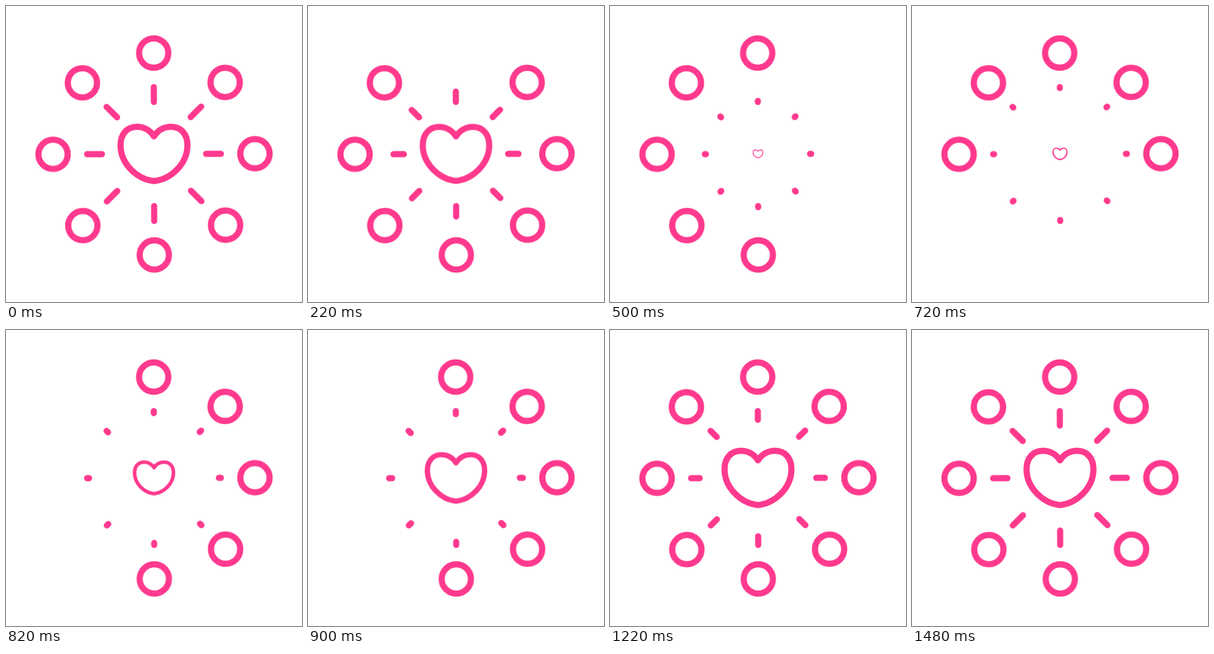
Recreate the animation shown at these times as an HTML page. Size 500 by 500 pixels, loop 1.5 s.

```html
<!DOCTYPE html>
<html lang="en">
<head>
<meta charset="utf-8">
<title>Heart with rays</title>
<style>
  html, body { margin: 0; width: 100%; height: 100%; overflow: hidden; background: #fff; }
  svg { display: block; width: 100vw; height: 100vh; }
  .art { fill: none; stroke: #ff3a8e; stroke-width: 10.4; stroke-linecap: round; stroke-linejoin: round; }

  .heart { transform-origin: 250px 249.7px; animation: beat 1.5s infinite; }
  .ray { stroke-dasharray: 25 60; animation: sweep 1.5s infinite; }
  .dot { animation: 1.5s step-end infinite; }
  .n { animation-name: hide-n; }
  .ne, .e { animation-name: hide-e; }
  .se { animation-name: hide-se; }
  .s { animation-name: hide-s; }
  .sw { animation-name: hide-sw; }
  .w, .nw { animation-name: hide-w; }

  @keyframes beat {
    0%, 13.33% { transform: scale(1); animation-timing-function: cubic-bezier(.364, 0, .636, 1); }
    40% { transform: scale(0); animation-timing-function: cubic-bezier(.364, 0, .636, 1); }
    66.67%, 100% { transform: scale(1); }
  }
  /* each ray drains inwards, then refills from its outer end */
  @keyframes sweep {
    0% { stroke-dashoffset: 0; animation-timing-function: cubic-bezier(.364, 0, .636, 1); }
    39.99% { stroke-dashoffset: -24.8px; animation-timing-function: step-end; }
    40% { stroke-dashoffset: 24.8px; animation-timing-function: cubic-bezier(.333, .105, .667, .524); }
    100% { stroke-dashoffset: 0; }
  }
  @keyframes hide-n { 0%, 17.33% { opacity: 1; } 6.67% { opacity: 0; } }
  @keyframes hide-e { 0%, 36% { opacity: 1; } 17.33% { opacity: 0; } }
  @keyframes hide-se { 0%, 54.67% { opacity: 1; } 17.33% { opacity: 0; } }
  @keyframes hide-s { 0%, 54.67% { opacity: 1; } 36% { opacity: 0; } }
  @keyframes hide-sw { 0%, 73.33% { opacity: 1; } 36% { opacity: 0; } }
  @keyframes hide-w { 0%, 73.33% { opacity: 1; } 54.67% { opacity: 0; } }
</style>
</head>
<body>
<svg viewBox="0 0 500 500">
  <g class="art">
    <path class="heart" d="M250 220.2C243 209 232 204 221 204C204 204 193.5 217 193.5 235C193.5 267 221 291 246 295.2Q250 296 254 295.2C279 291 306.5 267 306.5 235C306.5 217 296 204 279 204C268 204 257 209 250 220.2Z"/>
    <g transform="translate(250 250) rotate(-.17)">
      <g><path class="ray" d="M0-113V-88"/><circle class="dot n" cy="-170.5" r="24.7"/></g>
      <g transform="rotate(45)"><path class="ray" d="M0-113V-88"/><circle class="dot ne" cy="-170.5" r="24.7"/></g>
      <g transform="rotate(90)"><path class="ray" d="M0-113V-88"/><circle class="dot e" cy="-170.5" r="24.7"/></g>
      <g transform="rotate(135)"><path class="ray" d="M0-113V-88"/><circle class="dot se" cy="-170.5" r="24.7"/></g>
      <g transform="rotate(180)"><path class="ray" d="M0-113V-88"/><circle class="dot s" cy="-170.5" r="24.7"/></g>
      <g transform="rotate(225)"><path class="ray" d="M0-113V-88"/><circle class="dot sw" cy="-170.5" r="24.7"/></g>
      <g transform="rotate(270)"><path class="ray" d="M0-113V-88"/><circle class="dot w" cy="-170.5" r="24.7"/></g>
      <g transform="rotate(315)"><path class="ray" d="M0-113V-88"/><circle class="dot nw" cy="-170.5" r="24.7"/></g>
    </g>
  </g>
</svg>
</body>
</html>
```
